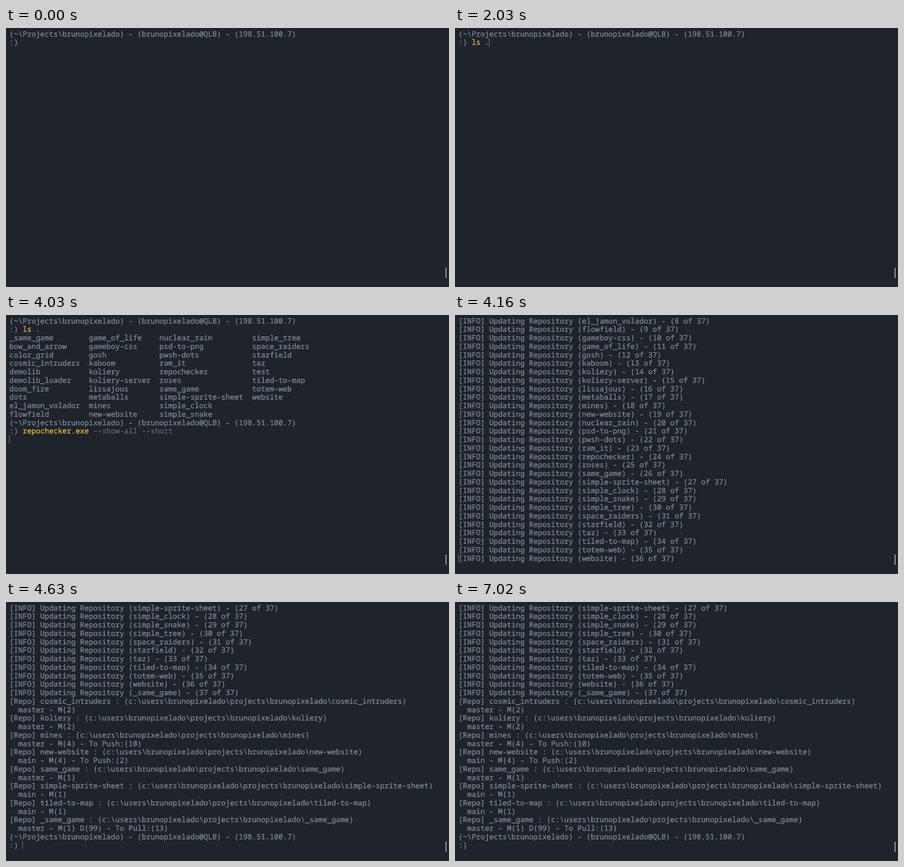
Animation of 977 by 573 pixels, one loop 7.09 s. Source, as an HTML page:

```html
<!DOCTYPE html>
<html lang="en">
<head>
<meta charset="utf-8">
<title>Terminal session</title>
<style>
  html, body { margin: 0; width: 100%; height: 100%; overflow: hidden; background: #1f232a; }
  svg { display: block; width: 977px; height: 573px; }
  text {
    font: 500 16.225px "Noto Sans Mono", "DejaVu Sans Mono", monospace;
    font-variant-ligatures: none;
    text-rendering: geometricPrecision;
    white-space: pre;
    color: #788591;
  }
  text, tspan { fill: currentColor; stroke: currentColor; stroke-width: 0.45px; }
  .cmd { color: #dcb24a; }
  .arg { color: #a3abb3; }
  .opt { color: #59626d; }
</style>
</head>
<body>
<svg viewBox="0 0 977 573">
  <rect width="977" height="573" fill="#1f232a"/>
  <g id="screen"></g>
  <rect id="cursor" width="1" height="19" fill="#8d969e"/>
  <rect x="969.5" y="530" width="2" height="23" fill="#b0b3b6"/>
</svg>
<script>
const LOOP = 7090, ROWS = 29;
const LEFT = 7.5, TOP = 3.5, CELL = 9.727, LINE = 18.75, BASE = 15;
const USER = "brunopixelado";
const PROMPT = `(~\\Projects\\${USER}) - (${USER}@QLB) - (198.51.100.7)`;

const dirs = `_same_game bow_and_arrow color_grid cosmic_intruders demolib
  demolib_loader doom_fire dots el_jamon_volador flowfield
  game_of_life gameboy-css gosh kaboom koliery
  koliery-server lissajous metaballs mines new-website
  nuclear_rain psd-to-png pwsh-dots ram_it repochecker
  roses same_game simple-sprite-sheet simple_clock simple_snake
  simple_tree space_raiders starfield taz test
  tiled-to-map totem-web website`.split(/\s+/);

// Directory listing, filled column by column
const widths = [18, 16, 21, 0];
const listing = Array.from({ length: 10 }, (_, row) =>
  widths.map((w, col) => (dirs[col * 10 + row] || "").padEnd(w)).join(""));

// Repositories are visited with underscores sorted after letters
const sortKey = name => name.replace(/_/g, "~");
const repos = dirs.filter(name => name !== "test")
  .sort((a, b) => sortKey(a) < sortKey(b) ? -1 : 1);
const info = repos.map((name, i) =>
  `[INFO] Updating Repository (${name}) - (${i + 1} of ${repos.length})`);

const report = [
  ["cosmic_intruders", "master - M(2)"],
  ["koliery", "master - M(2)"],
  ["mines", "master - M(4) - To Push:(10)"],
  ["new-website", "main - M(4) - To Push:(2)"],
  ["same_game", "master - M(1)"],
  ["simple-sprite-sheet", "main - M(1)"],
  ["tiled-to-map", "main - M(1)"],
  ["_same_game", "master - M(1) D(99) - To Pull:(13)"]
].flatMap(([name, status]) => [
  `[Repo] ${name} : (c:\\users\\${USER}\\projects\\${USER}\\${name})`,
  "  " + status
]);

// A line is a string or a list of [text, class] parts
const ready = [PROMPT, ":)"];
const typedLs = [PROMPT, [[":) "], ["ls", "cmd"], [" .", "arg"]]];
const listed = [...typedLs, ...listing];
const typedCheck = [...listed, PROMPT,
  [[":) "], ["repochecker.exe", "cmd"], [" --show-all --short", "opt"]]];
const tail = lines => lines.slice(-ROWS);

const screens = [
  [0, ready],
  [840, typedLs],
  [2290, [...listed, ...ready]],
  [2360, typedCheck],
  [4160, tail(info.slice(0, 36))],
  [4230, tail(info)],
  [4560, tail([...info, report[0]])],
  [4630, tail([...info, ...report, ...ready])]
];

// Time, then column and row of the cursor; no cell means hidden
const cursorSteps = [
  [0], [840, 7, 1], [1500], [2030, 7, 1], [2290],
  [3760, 37, 13], [3960], [4030, 0, 14], [4160, 0, 28],
  [4630, 3, 28], [5150], [5680, 3, 28], [6280], [6820, 3, 28], [7020]
];

const screenNode = document.getElementById("screen");
const cursorNode = document.getElementById("cursor");
const at = (steps, t) => steps.filter(step => step[0] <= t).pop();

function make(tag, attrs, parent) {
  const node = document.createElementNS("http://www.w3.org/2000/svg", tag);
  for (const key in attrs) node.setAttribute(key, attrs[key]);
  return parent.appendChild(node);
}

function drawLine(line, row) {
  const text = make("text", { x: LEFT, y: TOP + BASE + row * LINE }, screenNode);
  if (typeof line === "string") {
    text.textContent = line;
    return;
  }
  for (const [part, cls] of line) {
    make("tspan", cls ? { class: cls } : {}, text).textContent = part;
  }
}

let shown = null;
function render(t) {
  const lines = at(screens, t)[1];
  if (lines !== shown) {
    screenNode.replaceChildren();
    lines.forEach(drawLine);
    shown = lines;
  }
  const [, col, row] = at(cursorSteps, t);
  cursorNode.style.display = col === undefined ? "none" : "";
  if (col !== undefined) {
    cursorNode.setAttribute("x", Math.floor(LEFT + col * CELL));
    cursorNode.setAttribute("y", Math.floor(TOP + row * LINE));
  }
}

const start = performance.now();
function tick() {
  render((performance.now() - start) % LOOP);
  requestAnimationFrame(tick);
}
tick();
</script>
</body>
</html>
```
